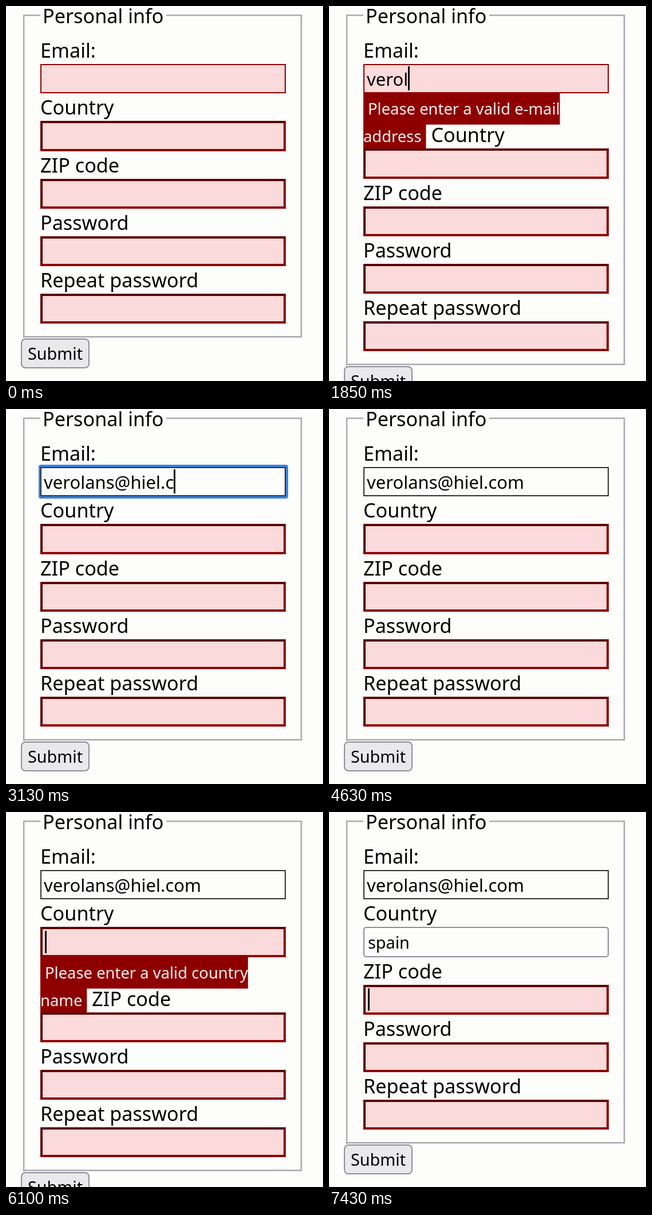
An HTML page that plays this animation: 554 px wide and 653 px high, repeating every 8 s.

```html
<!DOCTYPE html>
<html lang="en">
<head>
<meta charset="utf-8">
<title>Personal info form</title>
<style>
html, body { margin: 0; width: 100%; height: 100%; overflow: hidden; background: #fdfdfc; }
svg { display: block; font-family: "Noto Sans", sans-serif; }
text { white-space: pre; }
</style>
</head>
<body>
<svg id="stage" width="554" height="653" viewBox="0 0 554 653"></svg>
<script>
const stage = document.getElementById('stage');
const pen = document.createElement('canvas').getContext('2d');
const LOOP = 8000, LEFT = 60, WIDTH = 429, LINE = 48;
const LABEL = 34.2, NOTE = 27.4;
const PAPER = '#fdfdfc', PINK = '#fadada', RED = '#8e0000', DARK_RED = '#5c0000', GREY = '#8f8f9a';

const fields = [
  { label: 'Email:', base: 90, top: 101, h: 51, size: 31, edge: 2 },
  { label: 'Country', base: 189, top: 200, h: 53, size: 28.8, edge: 4 },
  { label: 'ZIP code', base: 290, top: 301, h: 52, size: 28.8, edge: 4 },
  { label: 'Password', base: 390, top: 401, h: 52, size: 28.8, edge: 4 },
  { label: 'Repeat password', base: 490, top: 501, h: 52, size: 28.8, edge: 4 }
];

const EMAIL = 'verolans@hiel.com', DIGITS = '87654321', COUNTRY = 'spain';
// time of each keystroke
const emailKeys = [1430, 1540, 1650, 1750, 1850, 1930, 2030, 2130, 2400,
                   2630, 2750, 2820, 2880, 3070, 3130, 3200, 3300];
const countryKeys = [6850, 6930, 7000, 7080, 7200];
// [time, digits left in the field]
const digitSteps = [[5350, 1], [5380, 2], [5430, 4], [5480, 5], [5530, 7], [5580, 8],
                    [5830, 5], [5880, 3], [5920, 1], [6070, 0]];

const typed = (word, keys, t) => word.slice(0, keys.filter(k => k <= t).length);

function stateAt(t) {
  const email = typed(EMAIL, emailKeys, t);
  let country = typed(COUNTRY, countryKeys, t);
  let note = null;
  const emailOk = /^\w+@\w+(\.\w+)*$/.test(email);
  if (email && !emailOk) note = { after: 0, lines: ['Please enter a valid e-mail', 'address'] };
  if (t >= 5350 && t < 6850) {
    country = DIGITS.slice(0, digitSteps.filter(s => s[0] <= t).pop()[1]);
    note = { after: 1, lines: ['Please enter a valid country', 'name'] };
  } else if (country && country.length < 4) {
    note = { after: 1, lines: ['Country should be at least', 'undefined characters long,',
      `you've entered ${country.length} characters`] };
  }
  return {
    values: [email, country, '', '', ''],
    valid: [emailOk, t >= 6850 && country.length > 3],
    focus: t < 720 ? -1 : t < 3880 ? 0 : t < 7430 ? 1 : 2,
    caret: !(t >= 4630 && t < 5350),
    note
  };
}

function widthOf(str, size) {
  pen.font = `${size}px "Noto Sans", sans-serif`;
  return pen.measureText(str).width;
}
const text = (x, y, size, str, fill = '#000') =>
  `<text x="${x}" y="${y}" font-size="${size}" fill="${fill}">${str}</text>`;
const rect = (x, y, w, h, fill, more = '') =>
  `<rect x="${x}" y="${y}" width="${w}" height="${h}" fill="${fill}" ${more}/>`;
const outline = (x, y, w, h, fill, color, r = 0) =>
  rect(x + 1, y + 1, w - 2, h - 2, fill, `stroke="${color}" stroke-width="2" rx="${r}"`);

function inset(x, y, w, h) {
  const b = 4, r = x + w, d = y + h;
  return rect(x, y, w, h, RED) +
    `<path fill="${DARK_RED}" d="M${x} ${d}V${y}H${r}l${-b} ${b}H${x + b}V${d - b}z"/>` +
    rect(x + b, y + b, w - 2 * b, h - 2 * b, PINK);
}

function fieldset(bottom) {
  const dark = '#a3a3ab', light = '#f0f0f0', h = bottom - 15;
  return rect(33, 18, 482, h - 6, 'none', `stroke="${light}" stroke-width="2"`) +
    rect(30, bottom - 1, 489, 2, light) + rect(517, 15, 2, h, light) +
    rect(30, 15, 2, h, dark) + rect(515, 15, 2, h - 1, dark) +
    rect(30, 15, 487, 2, dark) + rect(30, bottom - 3, 487, 2, dark) +
    rect(60, 12, 220, 10, PAPER) + text(64, 30, LABEL, 'Personal info');
}

// Message followed by the next label on its last line; returns the added height too
function message(lines, base, label) {
  let boxes = '', words = '', end = LEFT;
  const last = lines.length - 1;
  lines.forEach((line, i) => {
    const y = base + i * LINE, x = i ? LEFT : LEFT + 8, top = y - 39;
    end = x + widthOf(line, NOTE) + (i === last ? 8 : 0);
    const r = i === last ? 8 : 0, w = end - LEFT;
    boxes += `<path fill="${RED}" d="M${LEFT} ${top}h${w}v${56.5 - r}q0 ${r} ${-r} ${r}H${LEFT}z"/>`;
    words += text(x, y, NOTE, line, '#fdf0f0');
  });
  let y = base + last * LINE, x = end + widthOf(' ', LABEL), tail = '', extra = last * LINE;
  for (const word of label.split(' ')) {
    if (x + widthOf(word, LABEL) > LEFT + WIDTH) {
      x = LEFT; y += LINE; extra += LINE;
    }
    tail += text(x, y, LABEL, word);
    x += widthOf(word + ' ', LABEL);
  }
  return { svg: boxes + words + tail, extra };
}

function input(f, i, y, s) {
  const ok = s.valid[i], value = s.values[i], focused = s.focus === i;
  let out = '';
  if (ok) {
    if (focused) out += rect(57, y - 4, 436, f.h + 8, '#3584e4', 'rx="4"');
    out += i ? outline(LEFT, y, WIDTH, f.h, PAPER, GREY, 4)
             : outline(LEFT, y, WIDTH, f.h, PAPER, '#333');
  } else {
    out += i ? inset(LEFT, y, WIDTH, f.h) : outline(LEFT, y, WIDTH, f.h, PINK, RED);
  }
  const x = LEFT + f.edge + 4, mid = y + f.h / 2;
  out += text(x, Math.round(mid + f.size * 0.388), f.size, value);
  if (focused && s.caret) {
    const h = f.size * 1.362;
    out += rect(Math.round(x + widthOf(value, f.size)), Math.round(mid - h / 2), 3, Math.round(h), '#000');
  }
  return out;
}

function render(s) {
  let shift = 0, out = '', boxes = '';
  fields.forEach((f, i) => {
    if (s.note && s.note.after === i - 1) {
      const m = message(s.note.lines, f.base, f.label);
      out += m.svg;
      shift += m.extra;
    } else {
      out += text(LEFT, f.base + shift, LABEL, f.label);
    }
    boxes += input(f, i, f.top + shift, s);
  });
  return fieldset(578 + shift) + out + boxes +
    outline(26, 579 + shift, 120, 52, '#e9e9eb', GREY, 7) +
    text(38, 616 + shift, 28.8, 'Submit');
}

let shown = '';
const start = performance.now();
function tick() {
  const svg = render(stateAt((performance.now() - start) % LOOP));
  if (svg !== shown) stage.innerHTML = shown = svg;
  requestAnimationFrame(tick);
}
tick();
</script>
</body>
</html>
```
